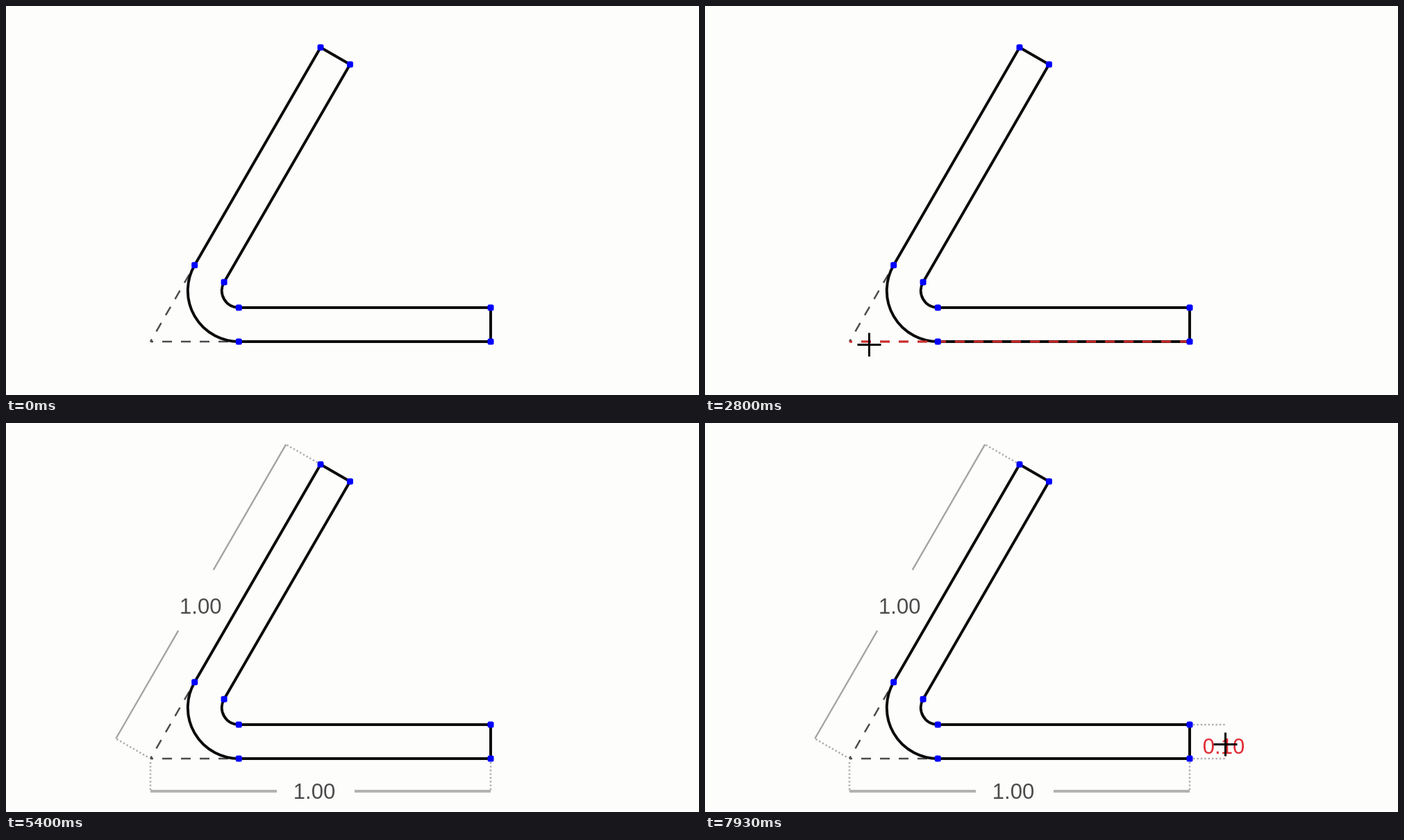
Animation, 998 px wide and 561 px high, one loop 8000 ms. Source, as an HTML page:

```html
<!DOCTYPE html>
<html lang="en">
<head>
<meta charset="utf-8">
<title>Bend dimensions</title>
<style>
  html, body { margin: 0; width: 100%; height: 100%; overflow: hidden; background: #fdfdfc; }
  svg { display: block; width: 100%; height: 100%; }
  path { fill: none; }
  text { font: 31px "Liberation Sans", Arial, sans-serif; text-anchor: middle; fill: #4c4c4c; }
  .outline { stroke: #0c0c0c; stroke-width: 4; stroke-linejoin: round; }
  .dash { stroke: #4c4c4c; stroke-width: 2.5; stroke-dasharray: 14 13; }
  .hot { stroke: #d22a2a; stroke-width: 2.8; stroke-dasharray: 14 13; }
  .dim { stroke: #b2b2b2; stroke-width: 4; }
  .thin { stroke: #a4a4a4; stroke-width: 2.4; }
  .ext { stroke: #b0b0b0; stroke-width: 2.6; stroke-dasharray: 2.4 3; }
  .dot { fill: #0000ff; }
  #soft { filter: blur(.6px); }
  #cursor { stroke: #000; stroke-width: 3; }
</style>
</head>
<body>
<svg viewBox="0 0 998 561">
  <g id="soft"></g>
  <path id="cursor" d="M-17 0H17M0 -17V17"/>
</svg>
<script>
const LOOP = 8000;
const LENGTH = 490, THICK = LENGTH / 10, INNER = THICK / 2, OUTER = INNER + THICK;
const ANGLE = Math.PI / 3;
const CORNER = [208, 484];

const soft = document.getElementById("soft");
const cursor = document.getElementById("cursor");

function add(tag, attrs, parent = soft) {
  const node = document.createElementNS("http://www.w3.org/2000/svg", tag);
  for (const name in attrs) node.setAttribute(name, attrs[name]);
  return parent.appendChild(node);
}

// Step from p by `along` in direction `angle` and by `side` to its right
function step(p, angle, along, side = 0) {
  const c = Math.cos(angle), s = Math.sin(angle);
  return [p[0] + along * c + side * s, p[1] - along * s + side * c];
}
const line = (...pts) => "M" + pts.map(p => p.join(" ")).join("L");

// Bent sheet: two legs of equal length, joined by concentric arcs
const bend = OUTER / Math.tan(ANGLE / 2);
const base = (along, side = 0) => step(CORNER, 0, along, side);
const leg = (along, side = 0) => step(CORNER, ANGLE, along, side);
const baseEnd = base(LENGTH), legEnd = leg(LENGTH);
const inside = [leg(LENGTH, THICK), leg(bend, THICK), base(bend, -THICK), base(LENGTH, -THICK)];
const outside = [baseEnd, base(bend), leg(bend), legEnd];

const arc = (r, sweep, p) => `A${r} ${r} 0 0 ${sweep} ${p.join(" ")}`;
const outline = line(legEnd, inside[0], inside[1]) + arc(INNER, 0, inside[2]) +
  line(inside[3], baseEnd, outside[1]).replace("M", "L") + arc(OUTER, 1, outside[2]) + "Z";

const path = (cls, d, parent) => add("path", { class: cls, d }, parent);

path("dash", line(baseEnd, CORNER));
path("dash", line(legEnd, CORNER));
path("outline", outline);

const edges = [
  { from: baseEnd, to: CORNER, hover: 2530, click: 3030 },
  { from: legEnd, to: CORNER, hover: 3560, click: 4230 },
  { from: baseEnd, to: inside[3], hover: 6570, click: 7070 }
];
for (const e of edges) e.hot = path("hot", line(e.from, e.to));

for (const [x, y] of [...inside, ...outside])
  add("rect", { class: "dot", x: x - 4.5, y: y - 4.5, width: 9, height: 9, rx: 2.5 });

// Dimension beside an edge: dotted extensions, a line with a gap, a label
function dimension(start, angle, size, side, gap, label, value, cls) {
  const g = add("g");
  const at = (along, off) => step(start, angle, along, off);
  const near = Math.sign(side) * 5;
  for (const along of [0, size]) path("ext", line(at(along, near), at(along, side)), g);
  if (gap) {
    path(cls, line(at(0, side), at(gap[0], side)), g);
    path(cls, line(at(gap[1], side), at(size, side)), g);
  }
  const [x, y] = at(...label);
  add("text", { x, y: y + 10.5 }, g).textContent = value;
  return g;
}
edges[0].dim = dimension(CORNER, 0, LENGTH, 47, [182, 294], [236, 47.5], "1.00", "dim");
edges[1].dim = dimension(CORNER, ANGLE, LENGTH, -57.5, [180, 281], [226, -47], "1.00", "dim thin");
edges[2].dim = dimension(baseEnd, Math.PI / 2, THICK, 52, null, [18, 49], "0.10");
const endLabel = edges[2].dim.querySelector("text");

// Pointer stops: time, x, y, easing power on the way there
const stops = [
  [870, 942, 568, 1], [1670, 268, 568, 1], [2500, 236, 488, 1],
  [3330, 236, 488, 1], [3870, 230, 443, 1], [5060, 230, 443, 1],
  [5400, 146, 585, 2], [5880, 792, 585, 1], [6230, 759, 469, 1],
  [6430, 701, 460, 1], [7440, 701, 460, 1], [7930, 749, 463, 1]
];

function pointer(t) {
  const i = stops.findIndex(s => s[0] > t);
  if (i < 0) return stops[stops.length - 1].slice(1, 3);
  const [t0, x0, y0] = stops[i - 1], [t1, x1, y1, power] = stops[i];
  const k = ((t - t0) / (t1 - t0)) ** power;
  return [x0 + (x1 - x0) * k, y0 + (y1 - y0) * k];
}

const ramp = (t, start) => Math.min(1, Math.max(0, (t - start) / 70));

function draw(t) {
  for (const { hot, dim, hover, click } of edges) {
    const placed = ramp(t, click);
    hot.setAttribute("opacity", ramp(t, hover) * (1 - placed));
    dim.setAttribute("opacity", placed);
  }
  const shown = t >= stops[0][0];
  cursor.setAttribute("opacity", shown ? 1 : 0);
  if (!shown) {
    endLabel.style.fill = "";
    return;
  }
  const [x, y] = pointer(t).map(v => Math.round(v) + 0.5);
  cursor.setAttribute("transform", `translate(${x} ${y})`);
  endLabel.style.fill = t > edges[2].click && x > 714 ? "#e02c34" : "";
}

const begin = performance.now();
function tick() {
  draw((performance.now() - begin) % LOOP);
  requestAnimationFrame(tick);
}
tick();
</script>
</body>
</html>
```
